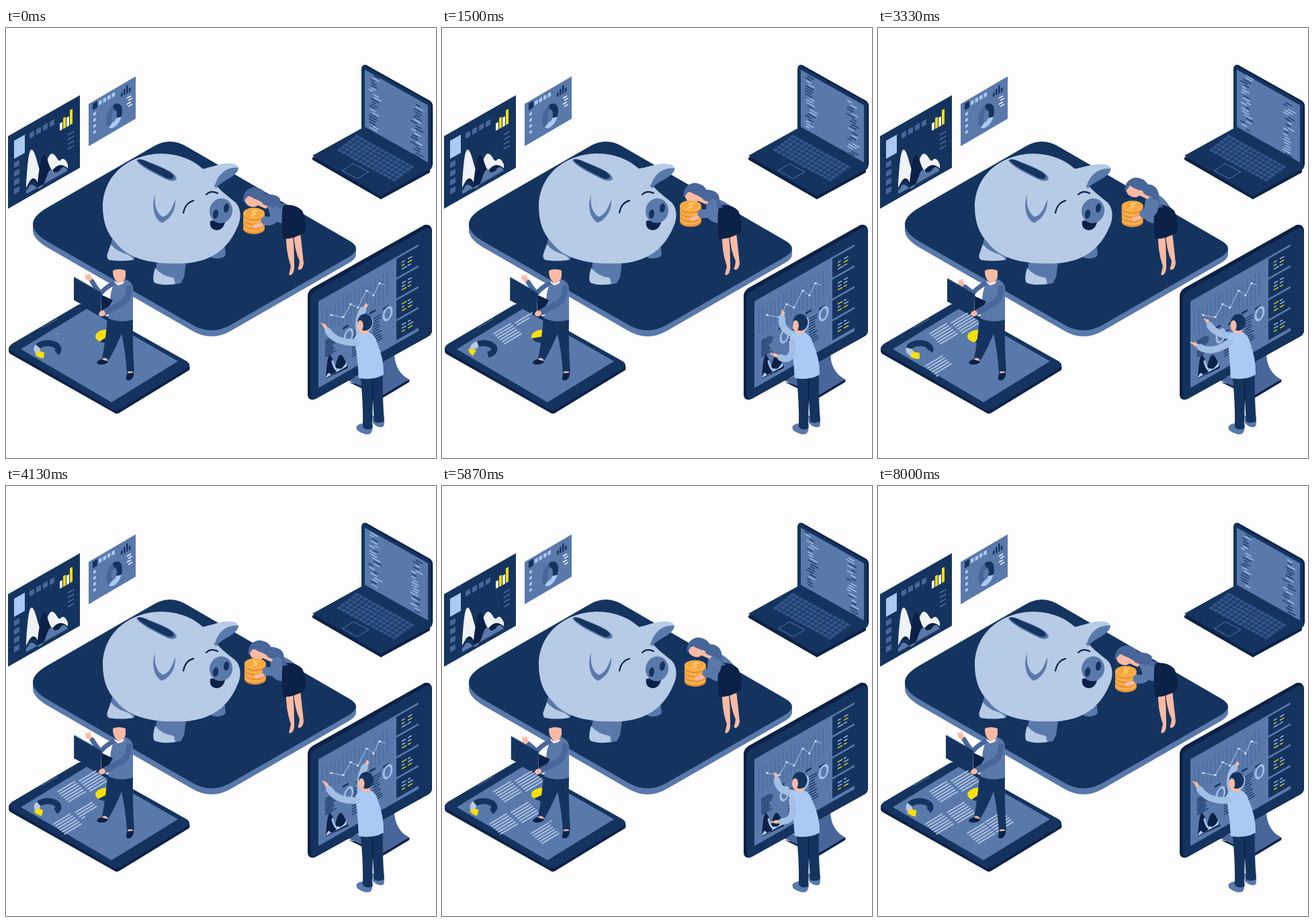
An HTML page with a canvas for the animation above (8.03 s loop, 640 by 640 pixels).

```html
<!DOCTYPE html>
<html lang="en">
<head>
<meta charset="utf-8">
<title>Savings and analytics</title>
<style>
html, body { margin: 0; width: 100%; height: 100%; overflow: hidden; background: #fdfdfd; }
canvas { display: block; width: 100vmin; height: 100vmin; }
</style>
</head>
<body>
<canvas id="stage" width="640" height="640"></canvas>
<script>
const ctx = document.getElementById('stage').getContext('2d');
const LOOP = 8030, TAU = Math.PI * 2;
const NAVY = '#14345f', INK = '#0c2147', STEEL = '#5a79ab', PALE = '#b7cbe6', SNOW = '#f0f2f6',
  DENIM = '#48669a', SLEEVE = '#a3bfe6', SKY = '#abcaf3', YELLOW = '#f7df0c', GOLD = '#fbb04a',
  AMBER = '#e8933a', SKIN = '#f9baa4', EDGE = '#33558a';

const fill = (d, c) => { ctx.fillStyle = c; ctx.fill(new Path2D(d)); };
const line = (d, c, w = 1) => {
  ctx.strokeStyle = c; ctx.lineWidth = w;
  ctx.lineCap = ctx.lineJoin = 'round';
  ctx.stroke(new Path2D(d));
};
const rect = (x, y, w, h, c) => { ctx.fillStyle = c; ctx.fillRect(x, y, w, h); };
const oval = (x, y, rx, ry, c, tilt = 0) => {
  ctx.beginPath(); ctx.ellipse(x, y, rx, ry, tilt, 0, TAU);
  ctx.fillStyle = c; ctx.fill();
};
const arc = (x, y, rx, ry, from, to, c, w) => {
  ctx.beginPath(); ctx.ellipse(x, y, rx, ry, 0, from * TAU / 360, to * TAU / 360);
  ctx.strokeStyle = c; ctx.lineWidth = w; ctx.lineCap = 'butt'; ctx.stroke();
};
// Draws on a wall plane: x runs along the slope, y stays vertical.
const wall = (x, y, slope, draw) => {
  ctx.save(); ctx.transform(1, slope, 0, 1, x, y); draw(); ctx.restore();
};
const noise = n => { const v = Math.sin(n * 127.1 + 3.7) * 43758.5453; return v - Math.floor(v); };

// Smooth cyclic curve through rows of [phase, ...values], phases 0 to 1.
function at(p, keys) {
  const n = keys.length - 1, i = Math.max(1, keys.findIndex(k => k[0] >= p));
  const a = keys[i - 1], b = keys[i], before = keys[(i - 2 + n) % n], after = keys[i < n ? i + 1 : 1];
  const span = b[0] - a[0], f = (p - a[0]) / span;
  const back = a[0] - before[0] + (i === 1), ahead = after[0] - b[0] + (i === n);
  return a.slice(1).map((v, j) => {
    const w = b[j + 1], m0 = (w - before[j + 1]) / (span + back) * span;
    const m1 = (after[j + 1] - v) / (span + ahead) * span, f2 = f * f, f3 = f2 * f;
    return v * (2 * f3 - 3 * f2 + 1) + m0 * (f3 - 2 * f2 + f) + w * (3 * f2 - 2 * f3) + m1 * (f3 - f2);
  });
}

function darkPanel() {
  wall(3, 161, -.57, () => {
    rect(0, 0, 107, 108, NAVY);
    rect(9, 12, 16, 27, SKY);
    for (let i = 0; i < 4; i++) {
      rect(32 + i * 10, 14, 7, 8, DENIM);
      rect(9, 45 + i * 13, 8, 8, DENIM);
      rect(89, 48 + i * 7, 9, 1.5, STEEL);
    }
    [11, 16, 14, 22].forEach((h, i) => rect(77 + i * 5, 36 - h, 4, h, i % 2 ? YELLOW : SNOW));
  });
  fill('M30 247V232C33 188 35 180 39 181C46 188 47 210 53 214C60 208 62 186 69 187C77 190 77 203 83 195Q88 193 92 203V213Z', SNOW);
  fill('M30 240C36 221 43 220 47 230C50 206 53 184 58 189C63 196 64 208 69 212C77 202 84 202 92 209V213L30 247Z', INK);
  fill('M30 247V239Q37 228 45 237Q53 244 60 223Q66 203 72 215Q79 215 82 209Q87 204 92 212Z', STEEL);
  line('M31 239Q38 223 46 234', NAVY, 3);
}

function lightPanel() {
  wall(123, 113, -.586, () => {
    rect(0, 0, 70, 63, STEEL);
    rect(6, 3, 7, 10, NAVY);
    for (let i = 0; i < 4; i++) {
      rect(15 + i * 6.5, 5, 4.5, 6, SKY);
      rect(7, 18 + i * 9, 4, 4, SKY);
      rect(57 + i % 2 * 2, 24 + i * 4.5, 6, 1.8, SNOW);
      rect(48 + i * 4, 12 - i % 3 * 3, 2.5, 6 + i % 3 * 3, NAVY);
    }
    arc(38, 40, 8, 13, -100, 30, NAVY, 8);
    arc(38, 40, 8, 13, 30, 130, SKY, 8);
    arc(38, 40, 8, 13, 130, 260, DENIM, 8);
  });
}

function platform() {
  const top = 'M62 267L220 176Q244 162 268 176L510 316Q532 328 510 341L336 441Q306 459 276 441L62 318Q18 292 62 267Z';
  ctx.save();
  ctx.translate(0, 9);
  for (let i = 9; i >= 0; i--) { fill(top, i ? STEEL : NAVY); ctx.translate(0, -1); }
  ctx.restore();
}

function coin(x, y, s) {
  ctx.save(); ctx.translate(x, y); ctx.rotate(-.08); ctx.scale(s, s);
  oval(1.2, 0, 10.5, 16, AMBER);
  oval(-1, 0, 9.5, 16, GOLD);
  line('M2 -6Q-5 -7 -3 -1Q4 0 1 5Q-2 7 -5 4M-1 -9V8', AMBER, 1.5);
  ctx.restore();
}

function pig(p) {
  const [tilt, squash] = at(p, [[0, 0, 0], [.16, 0, 0], [.41, -5, .018], [.66, 2, 0], [.85, 0, 0], [1, 0, 0]]);
  ctx.save();
  ctx.translate(245, 381); ctx.scale(1 + squash / 3, 1 - squash); ctx.translate(-245, -381);
  fill('M305 338Q303 343 315 343Q326 342 327 337L325 322H309Z', STEEL);
  fill('M159 310L154 330Q148 341 153 345Q170 348 190 345Q193 337 206 336L195 315Z', STEEL);
  fill('M156 322Q164 332 178 336Q187 339 190 345Q170 348 153 345Q149 341 151 336Z', PALE);
  fill('M225 345L222 366Q217 377 222 380Q240 384 260 380L265 371L269 342Z', STEEL);
  fill('M222 357Q231 369 250 372L252 381Q232 384 221 379Q217 374 222 357Z', PALE);
  fill('M144 265C145 218 184 188 230 187C265 187 290 202 306 224C315 240 329 249 342 260C351 270 350 286 344 297C331 328 307 346 271 350C221 353 183 345 164 320C150 306 144 288 144 265Z', PALE);
  ctx.save();
  ctx.translate(300, 228); ctx.rotate(tilt * TAU / 360); ctx.translate(-300, -228);
  fill('M300 222L318 212C330 204 342 203 346 208C345 222 318 228 313 239Z', STEEL);
  fill('M285 211C301 210 321 199 337 202Q345 203 346 208C330 206 316 216 311 234L304 233Z', PALE);
  ctx.restore();
  fill('M222 247C216 265 220 284 232 290C244 285 253 272 252 255C247 270 242 279 233 281C224 276 220 263 222 247Z', STEEL);
  line('M264 275Q267 260 279 257', INK, 2.2);
  line('M298 248Q305 241 315 246', INK, 2.2);
  fill('M304 287Q302 300 314 301Q325 300 327 284Z', INK);
  oval(320, 272, 17, 18.5, STEEL, .25);
  oval(312, 277, 4, 7, NAVY, .15);
  oval(328, 268, 4, 7, NAVY, .15);
  fill('M194 197Q199 193 212 199C235 208 254 216 254 225Q249 231 236 224C220 216 200 207 194 197Z', STEEL);
  fill('M195 196Q202 194 212 200C234 209 250 215 250 222Q246 228 234 221C218 213 200 204 195 196Z', NAVY);
  ctx.restore();

  ctx.save();
  ctx.clip(new Path2D('M150 50H300V223H250Q246 229 234 224C218 216 204 208 195 198Z'));
  if (p > .09 && p < .43) {
    coin(...at(p, [[0, 240, 162, 0], [.09, 240, 162, 0], [.16, 236, 158, .82], [.22, 235, 160, 1], [.364, 234, 228, 1], [.43, 234, 248, 1], [1, 240, 162, 0]]));
  }
  if (p > .06 && p < .53) {
    coin(...at(p, [[0, 207, 162, 0], [.06, 207, 162, 0], [.16, 213, 149, 1.06], [.25, 223, 146, 1], [.364, 231, 179, 1], [.41, 231, 207, 1], [.45, 232, 230, 1], [.53, 232, 248, 1], [1, 207, 162, 0]]));
  }
  ctx.restore();
}

function girl(p) {
  const [x, y, hx, hy, ex] = at(p, [
    [0, 369, 285, 366, 256, 412], [.26, 379, 274, 381, 241, 423], [.42, 378, 272, 381, 241, 423],
    [.589, 369, 275, 371, 251, 416], [.8, 370, 285, 366, 256, 413], [1, 369, 285, 366, 256, 412]]);
  fill('M417 306L427 308Q429 328 429 350Q430 364 425 367Q420 370 422 363L424 355Q416 331 417 306Z', SKIN);
  fill('M428 306L438 305Q441 330 443 350Q442 359 437 360Q433 360 436 354L437 347Q429 329 428 306Z', SKIN);
  fill(`M${hx + 20} ${hy + 2}Q${ex} ${hy + 2} 438 272L417 291Q401 292 394 280Z`, STEEL);
  fill('M412 264Q430 261 441 272Q448 286 445 304Q430 314 412 314Q409 287 412 264Z', INK);
  oval(hx, hy + 2, 11, 8, SKIN, .3);
  line(`M${hx + 9} ${hy + 4}L${hx + 20} ${hy + 9}`, SKIN, 7);
  fill(`M${hx - 13} ${hy + 3}Q${hx - 14} ${hy - 16} ${hx + 3} ${hy - 19}Q${hx + 16} ${hy - 18} ${hx + 21} ${hy - 9}
    Q${ex - 3} ${hy - 8} ${ex - 4} 257Q${ex - 2} 265 ${ex + 2} 266Q${ex - 10} 272 ${hx + 28} ${hy + 9}
    Q${hx + 16} ${hy + 9} ${hx + 13} ${hy + 1}Q${hx + 1} ${hy - 2} ${hx - 5} ${hy - 7}Z`, DENIM);
  for (let i = 3; i >= 0; i--) {
    oval(x, y - 9 + i * 6.5 + 3, 16, 8.5, AMBER);
    oval(x, y - 9 + i * 6.5, 16, 8.5, GOLD);
  }
  oval(x, y - 10, 12.5, 6, '#f8a63f');
  line(`M${x + 5} ${y - 13}Q${x - 5} ${y - 14} ${x - 1} ${y - 10}Q${x + 7} ${y - 9} ${x - 4} ${y - 6}`, '#ffd376', 2);
  line(`M${x + 33} ${y - 13}Q${x + 32} ${y + 5} ${x + 17} ${y + 2}`, STEEL, 13);
  line(`M${x + 10} ${y + 8}L${x + 2} ${y + 10}`, SKIN, 6);
}

function laptop(t) {
  fill('M456 193L530 150L631 211V215L558 255L456 196Z', INK);
  fill('M456 190L530 149L631 210L558 250Z', NAVY);
  fill('M491 182L522 158L609 207L579 229Z', EDGE);
  for (let i = 0; i < 7; i++) line(`M${491 + i * 5.1} ${182 - i * 4}l87 48`, NAVY, 1.3);
  for (let i = 0; i < 15; i++) line(`M${491 + i * 6.2} ${182 + i * 3.4}l31 -24`, NAVY, 1.2);
  line('M501 212L517 202L540 214L523 224Z', STEEL, 1);
  fill('M529 60Q530 54 536 55L630 108Q635 111 635 117V203Q634 212 629 211L529 153Z', NAVY);
  line('M535 56L630 109Q634 112 634 117V203', INK, 2.5);
  const screen = 'M534 62L628 115V200L534 147Z';
  fill(screen, STEEL);
  ctx.save();
  ctx.clip(new Path2D(screen));
  const scroll = t / LOOP * 224;
  for (const [x, y] of [[540, 67], [602, 109]]) {
    for (let i = 0; i < 21; i++) {
      const n = (i + Math.floor(scroll / 4)) % 56, shift = scroll % 4;
      const seed = n + x, w = 5 + noise(seed) * 7, sx = x + noise(seed + 80) * 9;
      const yy = y + i * 4 - shift + (sx - x) * .56;
      line(`M${sx} ${yy}l${w} ${w * .56}`, noise(seed + 31) < .5 ? NAVY : SKY, 1.3);
    }
  }
  ctx.restore();
}

function tablet(t) {
  fill('M4 480Q4 475 9 473L104 415Q112 409 121 414L269 498Q275 502 273 509L170 572Q165 576 160 572L8 486Q4 484 4 480Z', INK);
  fill('M4 476Q5 473 9 470L104 414Q112 408 121 413L269 496Q277 502 269 507L172 566Q165 571 158 567L8 481Q3 478 4 476Z', NAVY);
  fill('M22 478L120 418L256 496L157 557Z', STEEL);
  line('M53 446L76 433', STEEL, 1);

  [[77, 455], [109, 439], [71, 503], [103, 486], [133, 517], [160, 500]].forEach(([gx, gy], g) => {
    const typed = t / 1170 - g;
    for (let i = 0; i < 6; i++) {
      const f = Math.min(1, Math.max(0, typed * 6 - i));
      if (f) line(`M${gx + i * 3.2} ${gy + i * 3}l${25 * f} ${-15 * f}`, PALE, 1.7);
    }
  });

  const swing = Math.sin(t / LOOP * 2 * TAU), spin = swing * (swing > 0 ? 45 : 20);
  arc(62, 478, 16, 9, 205 + spin, 395 + spin, NAVY, 9);
  arc(62, 478, 16, 9, 150 + spin, 205 + spin, PALE, 9);
  arc(62, 478, 18, 10, 108 + spin, 150 + spin, YELLOW, 9);
  const slice = (from, to, c) => {
    ctx.beginPath(); ctx.moveTo(151, 459);
    ctx.ellipse(151, 459, 18, 10, 0, (from + spin) * TAU / 360, (to + spin) * TAU / 360);
    ctx.fillStyle = c; ctx.fill();
  };
  slice(130, 290, YELLOW);
  slice(290, 390, SNOW);
  slice(70, 130, NAVY);
}

function presenter(p) {
  const sway = (1 - Math.cos(p * TAU)) / 2, x = 123 + sway, y = 372 + sway * 8;
  fill('M151 429L189 433Q188 474 191 512L180 514Q178 483 172 455Q163 477 153 494L143 492Q149 462 151 429Z', NAVY);
  line('M146 493L149 494M183 513L187 513', SKIN, 4);
  fill('M141 493L152 496Q151 501 140 501Q133 500 136 496Z', INK);
  fill('M180 514L190 513Q191 520 185 524Q178 526 179 520Z', INK);
  fill('M161 376L178 374Q190 379 189 390V434Q170 440 152 432L156 395Z', STEEL);
  line(`M160 380Q147 387 141 395Q135 389 ${x + 5} ${y + 5}`, DENIM, 7);
  oval(x, y, 5, 4, SKIN, .5);
  line(`M${x - 1} ${y}l-3 -5M${x + 2} ${y}l-1 -6`, SKIN, 2);
  ctx.save(); ctx.translate(sway * 2, sway * 2);
  fill('M101 371L142 394L141 427L101 405Z', NAVY);
  line('M102 371L142 394V425', EDGE, 1);
  fill('M142 397L159 405L153 415L142 421Z', INK);
  ctx.restore();
  line('M183 387Q183 406 170 411L148 423', DENIM, 9);
  oval(143, 425, 5, 4, SKIN, -.4);
  fill('M163 373L174 373L174 381L167 383Z', SKIN);
  line('M162 378L167 382L175 378', SNOW, 2);
  fill('M159 361Q168 357 178 361V370Q176 379 168 378Q159 376 159 361Z', SKIN);
}

function monitor() {
  fill('M510 527L560 551L600 527L601 523L560 537Z', INK);
  fill('M508 524Q540 514 563 490L578 485Q579 512 600 523L560 547Z', DENIM);
  fill('M449 399Q449 392 456 387L623 293Q632 291 634 300V452Q633 457 627 460L461 552Q451 556 449 547Z', INK);
  fill('M454 401Q454 396 460 392L625 298Q633 295 633 303V450Q633 455 628 458L462 551Q455 555 454 548Z', NAVY);
  wall(463, 408, -.57, () => {
    rect(2, 0, 149, 129, STEEL);
    for (let i = 0; i < 4; i++) {
      const y = 3 + i * 31;
      rect(118, y, 33, 28, NAVY);
      for (let j = 0; j < 6; j++) {
        const yellow = noise(i * 7 + j) > .62;
        rect(126 + j % 2 * 9, y + 9 + Math.floor(j / 2) * 5, 4 + noise(i + j * 3) * 4, 1.5, yellow ? YELLOW : SKY);
      }
    }
    for (let i = 0; i < 17; i++) rect(8 + i * 6, 12 + noise(i) * 8, 1, 47 - noise(i + 9) * 12, DENIM);
    for (let i = 0; i < 10; i++) {
      rect(12, 64 + i * 2.6, 12 + noise(i) * 8, 1.4, NAVY);
      rect(52, 74 + i * 4, 8 + noise(i + 5) * 5, 1.5, NAVY);
      rect(83, 72 + i * 4, 9 + noise(i + 3) * 6, 1.5, NAVY);
      if (i < 4) rect(38 + i * 20, 60 + i % 2 * 5, 9, 3, NAVY);
    }
    for (let i = 0; i < 3; i++) arc(47 + i * 29, 77, 6, 9, 0, 360, SLEEVE, 3);
  });
  line('M484 427L502 431L513 411L524 416L537 390L547 398L556 379L564 383', SKY, 1);
  [[484, 427], [502, 430], [513, 411], [524, 416], [537, 391], [547, 398], [556, 380]]
    .forEach(([x, y]) => oval(x, y, 1.5, 1.5, SNOW));
  fill('M476 520Q478 488 482 486Q487 491 490 505Q494 483 500 487Q505 494 509 505V506L476 522Z', INK);
  fill('M476 521Q480 508 484 517Q491 515 493 507Q499 511 507 497V504Z', SKY);
  line('M486 496Q490 512 495 508', SKY, 3);
}

function arm(sx, sy, hx, hy, len) {
  const dx = hx - sx, dy = hy - sy, d = Math.hypot(dx, dy) || 1;
  const bend = Math.sqrt(Math.max(0, len * len - d * d / 4));
  const ex = (sx + hx) / 2 + dy / d * bend, ey = (sy + hy) / 2 - dx / d * bend;
  const wx = hx + (ex - hx) * .32, wy = hy + (ey - hy) * .32;
  line(`M${wx} ${wy}L${hx} ${hy}`, SKIN, 5);
  line(`M${hx} ${hy}l${(hx - ex) * .12 - 2} ${(hy - ey) * .12}`, SKIN, 2.5);
  line(`M${sx} ${sy}Q${ex} ${ey} ${wx} ${wy}`, SLEEVE, 10);
}

// The body sways twice while the arms make one round.
function analyst(p) {
  const [lx, ly, rx, ry] = at(p, [
    [0, 474, 443, 536, 413], [.19, 490, 459, 528, 413], [.58, 496, 512, 489, 437],
    [.726, 484, 491, 510, 436], [.83, 471, 470, 490, 436], [1, 474, 443, 536, 413]]);
  const hx = 537 + 6 * Math.cos((p * 2 - .36) * TAU), s = hx - 542;
  arm(532 + s * .6, 458, rx, ry, 25);
  fill('M545 577L562 576Q564 589 562 593Q555 597 546 588Z', STEEL);
  fill('M532 588L546 590Q546 601 542 604Q535 607 523 599Q519 593 525 590Z', STEEL);
  fill('M527 512L561 510Q560 550 563 585Q555 590 548 586L546 553L545 596Q537 600 531 594Q532 558 527 512Z', NAVY);
  line('M546 522V555', INK, 1.5);
  fill(`M${527 + s} 462Q${531 + s} 452 ${543 + s} 452Q${557 + s} 453 ${558 + s * .7} 467
    Q563 493 562 516Q546 525 525 521Q524 501 ${525 + s * .4} 482Z`, SKY);
  arm(527 + s * .6, 468, lx, ly, 31);
  fill(`M${hx - 8} 438L${hx + 5} 442L${hx + 7} 453Q${hx} 458 ${hx - 7} 452Z`, SKIN);
  oval(hx + 1, 438, 11, 12.5, NAVY);
  oval(hx - 6, 443, 4.5, 8, SKIN);
}

function draw(now) {
  const t = now % LOOP;
  const phase = cycles => t * cycles / LOOP % 1;
  rect(0, 0, 640, 640, '#fdfdfd');
  darkPanel();
  lightPanel();
  platform();
  pig(phase(4));
  girl(phase(3));
  laptop(t);
  tablet(t);
  presenter(phase(6));
  monitor();
  analyst(phase(2));
  requestAnimationFrame(() => draw(performance.now() - start));
}
const start = performance.now();
draw(0);
</script>
</body>
</html>
```
